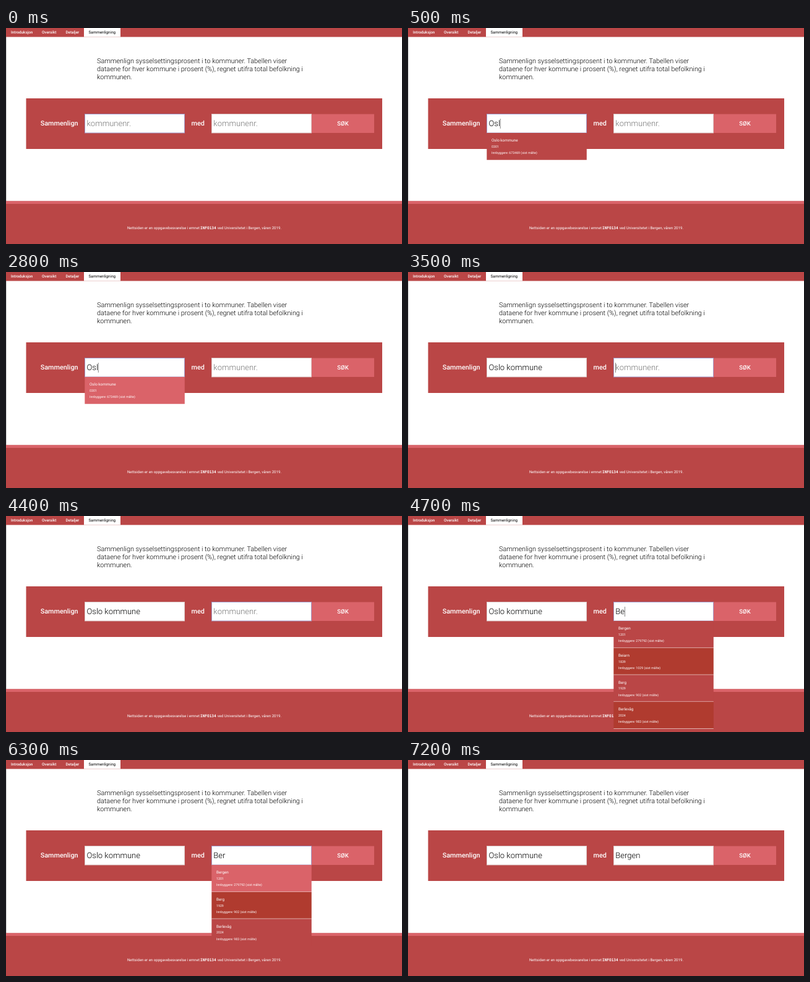
Write an HTML page that moves like this. It is 640x350 px and loops after 7.3 s.

```html
<!DOCTYPE html>
<html lang="no">
<head>
<meta charset="utf-8">
<title>Sammenligning</title>
<style>
html, body { margin: 0; width: 100%; height: 100%; overflow: hidden; background: #fff; }
svg { display: block; width: 640px; height: 350px; }
text { font-family: Roboto, Arial, sans-serif; text-rendering: geometricPrecision; }
svg, .white { fill: #fff; }
.red { fill: #ba4646; }
.pink { fill: #da6369; }
.brick { fill: #b03b2f; }
.nav { font-size: 6.3px; font-weight: 500; }
.nav .current { fill: #000; font-weight: 400; }
.intro { font-size: 10.85px; font-weight: 300; fill: #000; }
.label { font-size: 10.85px; font-weight: 500; }
.button { font-size: 9.5px; font-weight: 500; }
.foot { font-size: 6.12px; }
.code { font: bold 6.1px "DejaVu Sans Mono", monospace; }
.field { fill: #fff; stroke: #dccaca; }
.field.focus { stroke: #a39dcb; }
.value { font-size: 13px; font-weight: 300; fill: #000; }
.value.empty { fill: #777; }
.caret { fill: #555; }
.name { font-size: 6.35px; }
.small { font-size: 5.25px; }
</style>
</head>
<body>
<svg viewBox="0 0 640 350">
  <rect y="14" width="1" height="267" fill="#c8c8c8"/>
  <rect class="red" width="640" height="14.5"/>
  <rect class="white" x="126" width="59" height="14.5"/>
  <g class="nav">
    <text x="8" y="9">Introduksjon</text>
    <text x="58" y="9">Oversikt</text>
    <text x="96.5" y="9">Detaljer</text>
    <text class="current" x="133.5" y="9">Sammenligning</text>
  </g>
  <g class="intro">
    <text x="147" y="56.5">Sammenlign sysselsettingsprosent i to kommuner. Tabellen viser</text>
    <text x="147" y="69.5">dataene for hver kommune i prosent (%), regnet utifra total befolkning i</text>
    <text x="147" y="82.5">kommunen.</text>
  </g>
  <rect class="red" x="32.5" y="114" width="575.5" height="82"/>
  <text class="label" x="55.7" y="158.2">Sammenlign</text>
  <text class="label" x="299.5" y="158.2">med</text>
  <rect class="pink" x="493.5" y="139.5" width="101.5" height="30.5"/>
  <text class="button" x="544.5" y="158.2" text-anchor="middle">SØK</text>
  <rect class="red" y="280.5" width="640" height="69.5"/>
  <rect class="pink" y="280.5" width="640" height="4.5"/>
  <text class="foot" x="196" y="326">Nettsiden er en oppgavebesvarelse i emnet</text>
  <text class="code" x="314" y="326">INFO134</text>
  <text class="foot" x="341.7" y="326">ved Universitetet i Bergen, våren 2019.</text>
  <g id="form"></g>
</svg>
<script>
const LOOP = 7300, ROW = 43.75;
const form = document.getElementById('form');

// [name, number, inhabitants], ordered by number
const places = [
  ['Oppegård', '0217', 27394], ['Bærum', '0219', 126841],
  ['Oslo kommune', '0301', 673469], ['Os', '0441', 1948],
  ['Bamble', '0814', 14138], ['Bø', '0821', 6527],
  ['Birkenes', '0928', 5191], ['Bykle', '0941', 945],
  ['Bergen', '1201', 279792], ['Odda', '1228', 6769],
  ['Os', '1243', 20560], ['Osterøy', '1253', 8119],
  ['Osen', '1633', 965], ['Beiarn', '1839', 1029],
  ['Berg', '1929', 902], ['Berlevåg', '2024', 983]
];

// Last entry whose start time has passed
const at = (steps, t) => steps.filter(s => s[0] <= t).pop()[1];

const fields = [
  { x: 127, textX: 130.5, focus: [0, 3500], hover: 2600,
    typed: [[0, ''], [200, 'O'], [300, 'Os'], [400, 'Osl'], [3500, 'Oslo kommune']],
    caret: [[0, 0], [200, 1], [800, 0], [1400, 1], [1900, 0], [2400, 1], [3000, 0]] },
  { x: 332, textX: 335.3, focus: [3500, 7000], hover: 5800,
    typed: [[0, ''], [4500, 'B'], [4600, 'Be'], [4800, 'Ber'], [7000, 'Bergen']],
    caret: [[0, 1], [4000, 0], [4500, 1], [5200, 0], [5700, 1], [6200, 0]] }
];

const rect = (x, y, w, h, cls) =>
  `<rect x="${x}" y="${y}" width="${w}" height="${h}" class="${cls}"/>`;
const text = (x, y, cls, s) => `<text x="${x}" y="${y}" class="${cls}">${s}</text>`;

function menu(x, query, hovered) {
  const found = places.filter(p => p[0].startsWith(query));
  return found.map(([name, id, count], i) => {
    const y = 170 + i * ROW;
    const fill = hovered && !i ? 'pink' : i % 2 ? 'brick' : 'red';
    // Even rows carry a rule; the last odd one blends into its surroundings
    const ruled = i % 2 || i < found.length - 1;
    return rect(x, y, 161.5, ROW, fill) +
      (ruled ? `<g opacity=".75">${rect(x, y + ROW - 0.8, 161.5, 0.8, 'white')}</g>` : '') +
      text(x + 7.7, y + 14, 'name', name) +
      text(x + 7.7, y + 23.9, 'small', id) +
      text(x + 7.7, y + 34.2, 'small', `Innbyggere: ${count} (sist målte)`);
  }).join('');
}

function field(f, t) {
  const value = at(f.typed, t);
  const focused = t >= f.focus[0] && t < f.focus[1];
  return rect(f.x + 0.5, 139.5, 161, 30.5, `field ${focused ? 'focus' : ''}`) +
    text(f.textX, 159.2, value ? 'value' : 'value empty', value || 'kommunenr.') +
    (focused && at(f.caret, t) ? rect(f.textX, 147, 0.7, 16, 'caret') : '') +
    (focused && value ? menu(f.x + 0.3, value, t >= f.hover) : '');
}

let shown = '';
function draw(now) {
  const t = now % LOOP;
  const html = fields.map(f => field(f, t)).join('');
  if (html !== shown) {
    form.innerHTML = shown = html;
    const caret = form.querySelector('.caret');
    const value = caret && caret.previousElementSibling;
    if (value && !value.classList.contains('empty'))
      caret.setAttribute('x', +value.getAttribute('x') + value.getComputedTextLength());
  }
  requestAnimationFrame(draw);
}
draw(performance.now());
</script>
</body>
</html>
```
